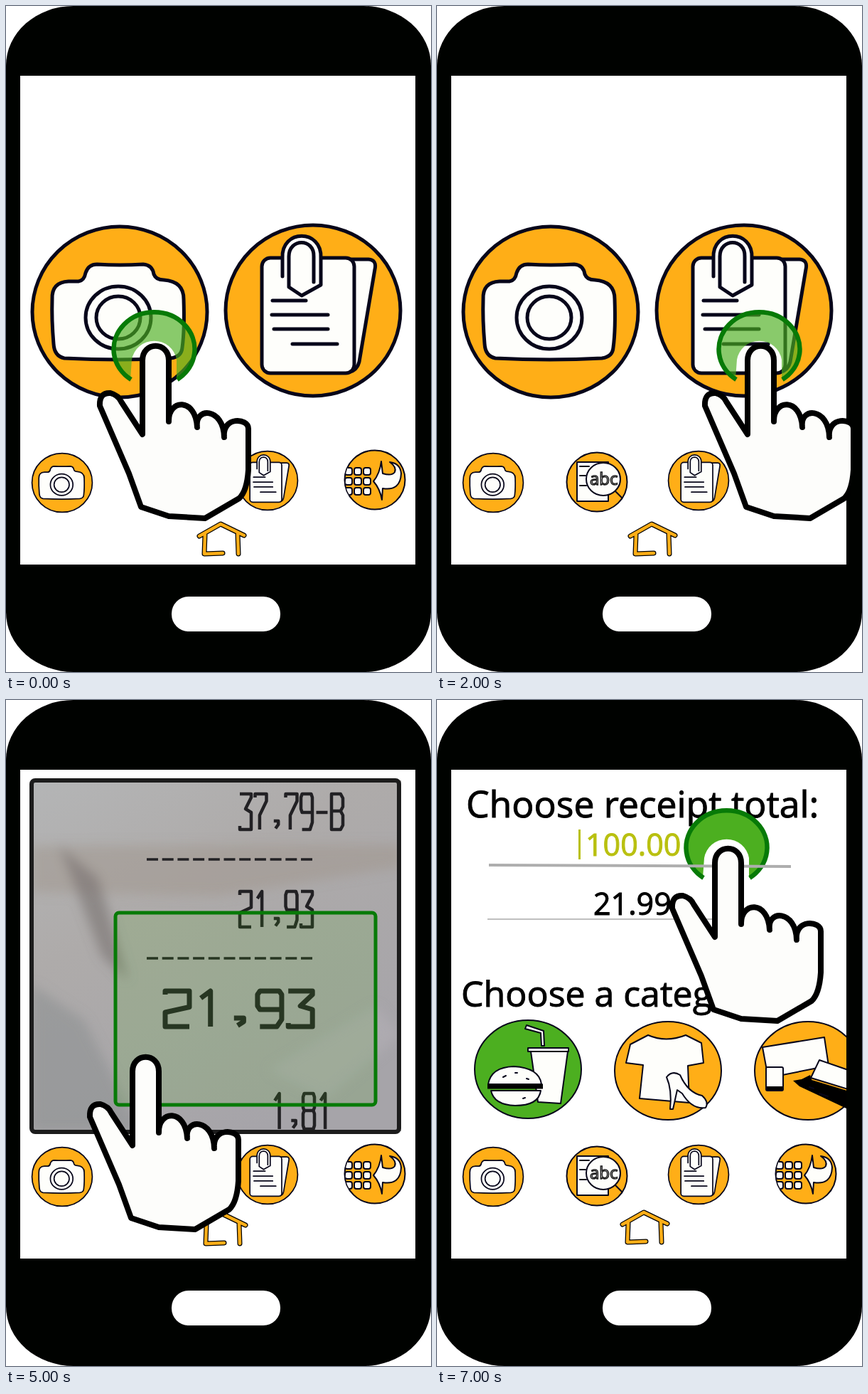
Write an HTML page that moves like this. It is 598 by 936 pixels and loops after 8000 ms.

```html
<!DOCTYPE html>
<html lang="en">
<head>
<meta charset="utf-8">
<title>Receipt app walkthrough</title>
<style>
  html, body { margin: 0; width: 100%; height: 100%; overflow: hidden; background: #fff; }
  svg { display: block; width: 100vw; height: 100vh; }
  text { font-family: "Open Sans", sans-serif; }
  .ink { fill: #fefefb; stroke: #07061a; stroke-width: 5; stroke-linejoin: round; stroke-linecap: round; }
  .line { fill: none; }
  .thin { stroke-width: 2; }
  .print path { vector-effect: non-scaling-stroke; fill: none; stroke: #222124; stroke-linejoin: round; }
</style>
</head>
<body>
<svg viewBox="0 0 598 936">
  <defs>
    <linearGradient id="paper" x2=".6" y2="1">
      <stop offset="0" stop-color="#b4b5b6"/><stop offset=".4" stop-color="#aeabaa"/><stop offset="1" stop-color="#a6a4a9"/>
    </linearGradient>
    <linearGradient id="fade" gradientUnits="userSpaceOnUse" x1="150" x2="450">
      <stop offset="0" stop-color="#005000" stop-opacity=".6"/><stop offset="1" stop-color="#306030" stop-opacity="0"/>
    </linearGradient>
    <filter id="soft"><feGaussianBlur stdDeviation="8"/></filter>
    <clipPath id="frame"><rect x="36" y="113" width="520" height="493"/></clipPath>
    <clipPath id="crop"><rect x="152" y="297" width="371" height="274" rx="5"/></clipPath>
    <clipPath id="screen"><rect x="20" y="98" width="556" height="687"/></clipPath>
    <clipPath id="reach"><rect width="582" height="936"/></clipPath>
    <clipPath id="disc"><ellipse cx="519" cy="666" rx="42" ry="41"/></clipPath>
    <path id="roof" d="M272 745 302 728 335 744M280 743 279 770 305 769M326 742 327 770" fill="none" stroke-linecap="round" stroke-linejoin="round"/>
    <path id="hand" d="M192 602V498C192 471 229 471 229 498V584C228 552 267 550 269 592C265 563 306 564 307 606C304 576 341 579 341 594V652Q339 682 328 692L280 720 229 717 190 704 173 657 132 562Q131 543 147 544Q158 547 162 556Z"
      fill="#fdfdfb" stroke="#000" stroke-width="8" stroke-linejoin="round"/>
    <path id="sweep" d="M42 512 94 409 115 436Q290 284 466 437L484 393 540 527 407 501 436 474Q300 346 150 487L183 513Z"/>
  </defs>
  <rect width="598" height="936" rx="95" ry="84" fill="#000200"/>
  <rect x="20" y="98" width="556" height="687" fill="#fff"/>
  <rect x="233" y="830" width="153" height="49" rx="24" fill="#fff"/>
  <g id="stage"></g>
</svg>
<script>
const ORANGE = '#ffae17', GREEN = '#4caf20', EDGE = '#077a07';
const ink = (d, cls = '') => `<path class="ink ${cls}" d="${d}"/>`;
const move = (x, y, body, scale = 1) => `<g transform="translate(${x} ${y}) scale(${scale})">${body}</g>`;
const disc = (x, y, rx, ry, fill, cls = '') =>
  `<ellipse class="ink ${cls}" cx="${x}" cy="${y}" rx="${rx}" ry="${ry}" style="fill:${fill}"/>`;
const hand = (x, y) => `<g clip-path="url(#reach)"><use href="#hand" x="${x}" y="${y}"/></g>`;
const ring = (x, y, opacity) => move(x, y,
  `<path d="M175 525A57 52 0 1 1 240 525V497A32 32 0 0 0 177 497Z" fill="${GREEN}" fill-opacity="${opacity}"/>
   <path d="M176 525A57 52 0 1 1 241 525" fill="none" stroke="${EDGE}" stroke-width="6.5"/>`);
const label = (x, y, size, str, fill = '#000') =>
  `<text x="${x}" y="${y}" font-size="${size}" fill="${fill}" stroke="${fill}">${str}</text>`;

// Large icons are drawn around their own centre so the toolbar can reuse them.
const camera = fill => move(-160, -430, disc(160, 430, 123, 120, fill) +
  ink('M65 412Q64 388 88 387H102Q110 386 112 375Q116 363 128 363Q160 365 193 363Q206 364 208 377Q211 385 222 385Q250 387 250 412C251 440 250 465 248 480Q247 493 232 495Q160 499 82 495Q68 492 67 475Q64 440 65 412Z') +
  disc(158, 438, 46, 44, 'none') + disc(158, 438, 31, 30, 'none'));
const papers = fill => move(-432, -428, disc(432, 428, 123, 120, fill) +
  ink('M480 356H510Q522 357 519 370L497 500Q493 515 478 515Z') +
  '<rect class="ink" x="360" y="354" width="130" height="162" rx="12"/>' +
  ink('M375 414H422M374 434H453M377 454H453M403 475H466', 'line') +
  ink('M389 380V354C387 313 445 313 443 354V392L416 407 398 395V352C398 326 434 326 433 352V388'));

const search = disc(225, 669, 42.5, 41.5, ORANGE, 'thin') +
  ink('M197 641H241V696H197ZM201 647H214M201 660H209M201 674H210', 'thin') +
  disc(234, 665, 24, 23, '#fefefb', 'thin') + ink('M251 682 260 691', 'thin') +
  '<text x="215" y="673" font-size="24" fill="#ddd" stroke="#222" stroke-width="1.5">abc</text>';

function exportIcon() {
  let keys = '';
  for (let i = 0; i < 9; i++)
    keys += `<rect class="ink thin" x="${477 + i % 3 * 13}" y="${649 + (i / 3 | 0) * 14}" width="10" height="10" rx="3"/>`;
  return disc(519, 666, 42.5, 41.5, ORANGE, 'thin') + `<g clip-path="url(#disc)">${keys}</g>` +
    ink('M528 640Q526 657 517 668Q526 678 529 694L530 678Q555 682 556 657Q555 643 540 641Q550 648 547 655Q543 661 530 657Z', 'thin');
}

const toolbar = (homeX, homeY) =>
  move(79, 670, camera(ORANGE), .345) + search + move(368, 667, papers(ORANGE), .345) + exportIcon() +
  move(homeX, homeY, `<use href="#roof" stroke="#000" stroke-width="7"/><use href="#roof" stroke="${ORANGE}" stroke-width="4.5"/>`);

// Unit-square strokes for the printed receipt figures.
const GLYPHS = {
  1: 'M.2 .2 .6 0V1', 2: 'M0 .1V0H1V.45L0 .6V1H1', 3: 'M0 0H1V.1L.5 .42 1 .52V1H0V.9',
  7: 'M0 .1V0H1V.2L.4 .6V1', 8: 'M.1 0H.9L1 .1V.4L.9 .48 1 .57V.9L.9 1H.1L0 .9V.57L.1 .48 0 .4V.1ZM.1 .48H.9',
  9: 'M1 .52H.1L0 .42V.1L.1 0H.9L1 .1V.8L.8 1H.1', B: 'M0 0H.8L1 .12V.36L.8 .48 1 .6V.88L.8 1H0ZM0 .48H.8',
  ',': 'M.3 .76H.7V.86L.45 .97', '-': 'M0 .52H1'
};
const print = (str, x, y, pitch, width, weight) => [...str].map((c, i) =>
  `<path transform="translate(${x + i * pitch} ${y}) scale(${width} 50)" d="${GLYPHS[c]}" stroke-width="${weight}"/>`).join('');

const photo = clip => `<g clip-path="url(#${clip})">
  <rect x="36" y="113" width="520" height="494" fill="url(#paper)"/>
  <g filter="url(#soft)">
    <path d="M36 205 556 203V235L300 275 36 270Z" fill="#a0958d" opacity=".5"/>
    <path d="M75 205 130 250 172 395 135 360Z" fill="#77716f" opacity=".6"/>
    <path d="M36 400 110 450 190 607H36Z" fill="#929596" opacity=".7"/>
    <path d="M370 520 520 430 556 470 450 560Z" fill="#b5b2b8" opacity=".5"/>
  </g>
  <g class="print">
    ${print('37,79-B', 329, 132, 21.5, 16, 4.5)}${print('21,93', 329, 269, 21.5, 16, 4.5)}
    ${print('21,93', 224, 409, 43.3, 34, 7)}${print('1,81', 375, 553, 21.5, 16, 4.5)}
    <path d="M198 224H432M198 363H432" stroke-width="3.5" stroke-dasharray="16 5.7"/>
  </g></g>`;
const border = color => `<rect x="36" y="113" width="517" height="494" rx="5" fill="none" stroke="${color}" stroke-width="6"/>`;

const food = ink('M132 494 142 565 174 567 184 494Z', 'thin') + ink('M128 489H185V494H128Z', 'thin') +
  ink('M147 486 146 468 124 462 126 457 150 465 151 486Z', 'thin') +
  ink('M72 540Q76 516 108 515Q144 517 147 540ZM76 549H146Q143 570 110 570Q80 569 76 549Z', 'thin') +
  '<path d="M71 543H149" stroke="#000" stroke-width="7"/>' +
  ink('M93 530 97 528M110 524H113M126 532 129 533M121 560 124 559', 'thin');
const clothes = ink('M297 471Q322 482 350 471L372 482 375 510 353 514 355 566 285 560 290 513 266 510 272 484Z', 'thin') +
  ink('M323 530Q331 520 342 527Q353 552 373 556Q383 565 378 573Q359 576 345 553L338 548 332 575H328Q331 548 323 530Z', 'thin');
const devices = ink('M458 488 545 474 551 514 466 531Z', 'thin') +
  '<rect class="ink thin" x="463" y="516" width="24" height="33" rx="2"/><path d="M464 543H486V548H464Z"/>' +
  '<path d="M501 535 513 533 525 527 528 536 510 543ZM510 543 524 533 590 553 580 576Z"/>' +
  ink('M538 506 590 524 582 548 526 531Z', 'thin') + ink('M538 553 550 557M524 544 530 546', 'thin');

const menu = (left, right, x) => move(160, 430, camera(left)) + move(432, 428, papers(right)) +
  toolbar(0, 0) + ring(x, 0, .65) + hand(x, 0);

const scenes = [
  menu(ORANGE, ORANGE, 0),
  menu(GREEN, ORANGE, 0),
  menu(ORANGE, ORANGE, 245),
  menu(ORANGE, GREEN, 245),
  photo('frame') + border('#1c1c1c') + ring(24, 193, 1) + toolbar(2, -6) + ring(24, 193, .65) + hand(25, 195),
  photo('frame') + border('#1c1c1c') + toolbar(2, -6) +
    `<rect x="154" y="299" width="366" height="270" rx="5" fill="${GREEN}" fill-opacity=".15" stroke="${EDGE}" stroke-width="5"/>` +
    hand(-14, 24),
  border('#000') + toolbar(2, -6) + '<path d="M42 512 94 409 115 436 152 410V486L183 513Z" fill="#005000"/>' + photo('crop') +
    `<use href="#sweep" fill="url(#fade)" stroke="${EDGE}" stroke-width="10"/>` + hand(-14, 24),
  label(41, 165, 51.7, 'Choose receipt total:') + label(209, 219, 43, '100.00', '#b9c010') +
    '<path d="M199 182H202V224H199Z" fill="#b9c010"/>' +
    label(220, 302, 43, '21.99') + label(34, 431, 50, 'Choose a category:') + ring(199, -275, 1) +
    '<path d="M73 232 498 234" stroke="#aeaeae" stroke-width="4"/><path d="M71 308H500" stroke="#aaa" stroke-width="1.5"/>' +
    '<g clip-path="url(#screen)">' +
    disc(128, 519, 75, 69, GREEN, 'thin') + food + disc(325, 521, 75, 69, ORANGE, 'thin') + clothes +
    disc(522, 521, 75, 69, ORANGE, 'thin') + devices + '</g>' +
    toolbar(-11, -8) + hand(199, -269)
];

const stage = document.getElementById('stage');
let shown = -1;
function tick(now) {
  const step = Math.floor(now / 1000) % scenes.length;
  if (step !== shown) stage.innerHTML = scenes[shown = step];
  requestAnimationFrame(tick);
}
tick(performance.now());
</script>
</body>
</html>
```
